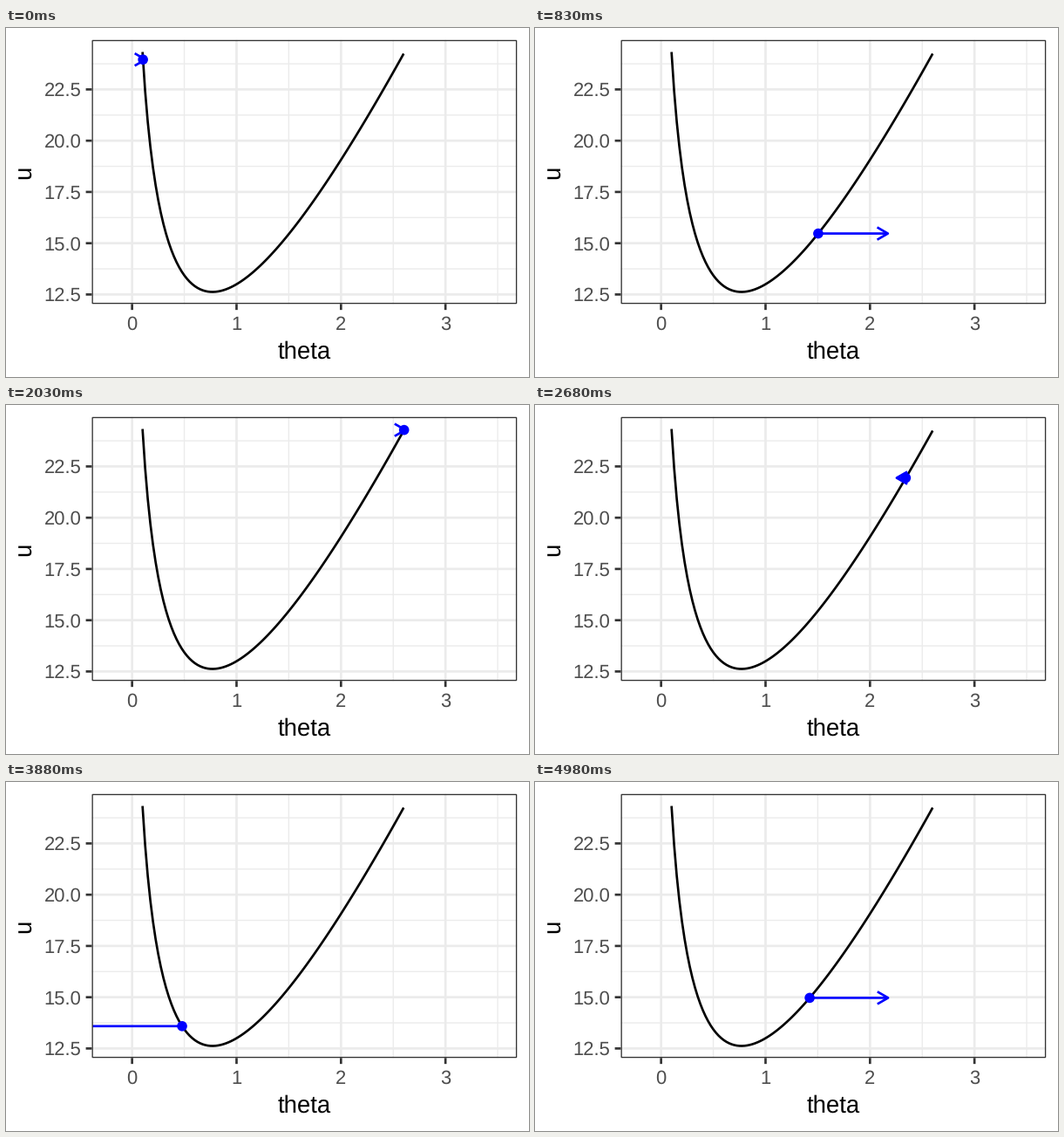
Write a matplotlib script that moves like this. It is 600 by 400 pixels and loops after 5 s.

```python
import numpy as np
import matplotlib.pyplot as plt
from matplotlib.animation import FuncAnimation
from matplotlib.patches import Circle, Rectangle

plt.rcParams["font.family"] = "Liberation Sans"
plt.rcParams["text.hinting"] = "none"

W, H, DPI = 600, 400, 100
PT = 72 / DPI                                  # points per pixel
LEFT, RIGHT, TOP, BOTTOM = 98.5, 586.25, 13.75, 316.25
X_MIN, X_MAX = -0.385, 3.685
THICK, THIN = 2.67, 1.33
STEPS, EPS = 200, 0.01


def potential(th):
    return 13 * th - 10 * np.log(th)


def slope(th):
    return 13 - 10 / th


theta = np.linspace(0.1, 2.6, 101)
u = potential(theta)
pad = 0.05 * np.ptp(u)
Y_MIN, Y_MAX = u.min() - pad, u.max() + pad


def px(th):
    return LEFT + (th - X_MIN) / (X_MAX - X_MIN) * (RIGHT - LEFT)


def py(v):
    return BOTTOM - (v - Y_MIN) / (Y_MAX - Y_MIN) * (BOTTOM - TOP)


def leapfrog(th, p, n):
    path = []
    for _ in range(n):
        p -= EPS / 2 * slope(th)
        th += EPS * p
        p -= EPS / 2 * slope(th)
        path.append((th, p))
    return path


path = leapfrog(0.1, 0.0, STEPS)

fig = plt.figure(figsize=(W / DPI, H / DPI), dpi=DPI, facecolor="white")
ax = fig.add_axes([0, 0, 1, 1])
ax.set_xlim(0, W)
ax.set_ylim(H, 0)
ax.axis("off")


def line(x, y, color, width, z):
    art, = ax.plot(x, y, color=color, lw=width * PT, zorder=z, snap=False,
                   solid_capstyle="butt", solid_joinstyle="round")
    return art


def label(x, y, text, size, color, **kw):
    ax.text(x, y, text, fontsize=size * PT, color=color, va="baseline", **kw)


# grid, ticks and tick labels
for v in np.arange(0.5, 4):
    line([px(v)] * 2, [TOP, BOTTOM], "#ebebeb", THIN, 1)
for v in np.arange(13.75, 24, 2.5):
    line([LEFT, RIGHT], [py(v)] * 2, "#ebebeb", THIN, 1)
for v in range(4):
    x = px(v)
    line([x, x], [TOP, BOTTOM], "#ebebeb", THICK, 2)
    line([x, x], [BOTTOM, BOTTOM + 6.9], "#333333", THICK, 2)
    label(x, 346, str(v), 22, "#4d4d4d", ha="center")
for v in np.arange(12.5, 23, 2.5):
    y = py(v)
    line([LEFT, RIGHT], [y, y], "#ebebeb", THICK, 2)
    line([LEFT - 6.9, LEFT], [y, y], "#333333", THICK, 2)
    label(86.4, y + 7.7, f"{v:.1f}", 22, "#4d4d4d", ha="right")
label((LEFT + RIGHT) / 2, 379, "theta", 27.5, "black", ha="center")
label(28.7, (TOP + BOTTOM) / 2, "u", 27.5, "black", ha="center",
      rotation=90, rotation_mode="anchor")

line(px(theta), py(u), "black", THICK, 3)

half = THIN / 2
ax.add_patch(Rectangle((LEFT + half, TOP + half), RIGHT - LEFT - THIN,
                       BOTTOM - TOP - THIN, fill=False, ec="#333333",
                       lw=THIN * PT, zorder=6, snap=False))

panel = Rectangle((LEFT, TOP), RIGHT - LEFT, BOTTOM - TOP,
                  transform=ax.transData)
shaft = line([], [], "blue", THICK, 4)
head = line([], [], "blue", THICK, 4)
dot = ax.add_patch(Circle((0, 0), 5.8, fc="blue", ec="none", zorder=5))
for art in (shaft, head):
    art.set_clip_path(panel)

BARB = 14.17                                   # barb length, 30 degrees open
BACK, SIDE = BARB * np.cos(np.pi / 6), BARB / 2


def draw(i):
    th, p = path[i]
    way = np.sign(p)
    x, y = px(th), py(potential(th))
    tip = px(th + way * 0.01 * np.exp(abs(p)))
    tail = tip - way * BACK
    shaft.set_data([x, tip], [y, y])
    head.set_data([tail, tip, tail], [y - SIDE, y, y + SIDE])
    dot.center = x, y
    return shaft, head, dot


anim = FuncAnimation(fig, draw, frames=STEPS, init_func=lambda: draw(0),
                     interval=25, repeat=True, repeat_delay=0)
plt.show()
```
